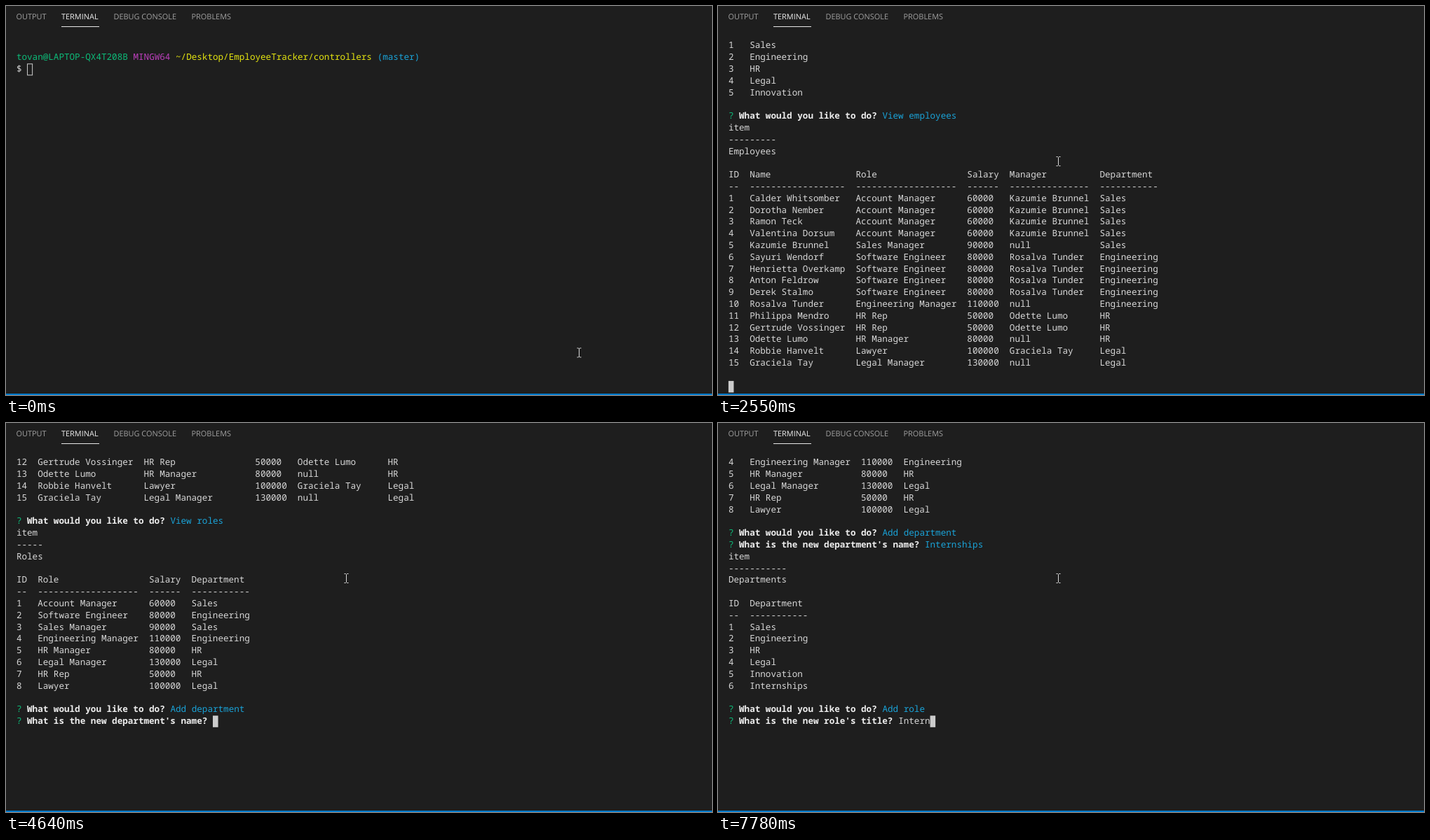
Write an HTML page that moves like this. It is 1007x556 px and loops after 8 s.

```html
<!DOCTYPE html>
<html lang="en">
<head>
<meta charset="utf-8">
<title>Terminal session</title>
<style>
  html, body { margin: 0; width: 100%; height: 100%; overflow: hidden; background: #1e1e1e; }
  svg { display: block; width: 1007px; height: 556px; }
  text { white-space: pre; text-rendering: geometricPrecision; }
  #tabs { font: 10.93px "Open Sans", "Noto Sans", sans-serif; fill: #a0a0a0; }
  #tabs .on { fill: #f0f0f0; }
  #rows { font: 12.617px "Noto Sans Mono", "DejaVu Sans Mono", monospace; fill: #d8d8d8; }
  .green { fill: #0dbc79; }
  .purple { fill: #bc3fbc; }
  .yellow { fill: #e5e510; }
  .cyan { fill: #1aa3d8; }
  .pick { fill: #1ea6e6; }
  .bold { fill: #ededed; font-weight: 700; }
</style>
</head>
<body>
<svg viewBox="0 0 1007 556">
  <rect width="1007" height="556" fill="#1e1e1e"/>
  <g id="tabs">
    <text x="14.5" y="19.3">OUTPUT</text>
    <text x="79" y="19.3" class="on">TERMINAL</text>
    <text x="153.5" y="19.3">DEBUG CONSOLE</text>
    <text x="264.5" y="19.3">PROBLEMS</text>
  </g>
  <rect x="79" y="29" width="54" height="1" fill="#e7e7e7"/>
  <g id="rows"></g>
  <rect id="caret"/>
  <path id="mouse" fill="none" stroke="#d8d8d8" d="M-3 -6.5H-1L0 -5.5L1 -6.5H3M0 -5.5V5.5M-3 6.5H-1L0 5.5L1 6.5H3"/>
  <rect y="554" width="1007" height="2" fill="#007acc"/>
</svg>
<script>
const LOOP = 8000, ROWS = 30, X0 = 14.9, Y0 = 48.7, CW = 7.57, RH = 16.8;
const HIDDEN = 0, SOLID = 1, HOLLOW = 2;
const $ = id => document.getElementById(id);

// A line is a list of [text, class] pieces.
const plain = s => [[s, '']];
const width = line => line.reduce((n, [s]) => n + s.length, 0);

function table(head, body) {
  const w = head.map((h, i) => Math.max(h.length, ...body.map(r => r[i].length)));
  const row = cells => plain(cells.map((c, i) => c.padEnd(w[i])).join('  '));
  return [row(head), row(w.map(n => '-'.repeat(n))), ...body.map(row), []];
}
const numbered = (head, body) =>
  table(['ID', ...head], body.map((r, i) => [String(i + 1), ...r]));
const titled = name => table(['item'], [[name]]);

const depts = ['Sales', 'Engineering', 'HR', 'Legal', 'Innovation'];
const roles = [
  ['Account Manager', '60000', 'Sales'],
  ['Software Engineer', '80000', 'Engineering'],
  ['Sales Manager', '90000', 'Sales'],
  ['Engineering Manager', '110000', 'Engineering'],
  ['HR Manager', '80000', 'HR'],
  ['Legal Manager', '130000', 'Legal'],
  ['HR Rep', '50000', 'HR'],
  ['Lawyer', '100000', 'Legal']
];
// Name, role index, index of the manager in this list.
const staff = [
  ['Calder Whitsomber', 0, 4], ['Dorotha Nember', 0, 4], ['Ramon Teck', 0, 4],
  ['Valentina Dorsum', 0, 4], ['Kazumie Brunnel', 2], ['Sayuri Wendorf', 1, 9],
  ['Henrietta Overkamp', 1, 9], ['Anton Feldrow', 1, 9], ['Derek Stalmo', 1, 9],
  ['Rosalva Tunder', 3], ['Philippa Mendro', 6, 12], ['Gertrude Vossinger', 6, 12],
  ['Odette Lumo', 4], ['Robbie Hanvelt', 7, 14], ['Graciela Tay', 5]
];

const deptTable = list => [...titled('Departments'), ...numbered(['Department'], list.map(d => [d]))];
const roleTable = () => [...titled('Roles'), ...numbered(['Role', 'Salary', 'Department'], roles)];
const staffTable = () => [...titled('Employees'),
  ...numbered(['Name', 'Role', 'Salary', 'Manager', 'Department'], staff.map(([name, r, boss]) => {
    const [role, pay, dept] = roles[r];
    return [name, role, pay, boss === undefined ? 'null' : staff[boss][0], dept];
  }))];

const choices = ['View departments', 'View employees', 'View roles', 'Add department',
  'Add role', 'Add employee', 'Update role'];
const ask = (question, reply, cls = 'cyan') =>
  [['? ', 'green'], [question, 'bold'], [' ' + reply, cls]];
const TODO = 'What would you like to do?';
const menu = (pick, hint = '') => [
  ask(TODO, hint, ''),
  ...choices.map((c, i) => i === pick ? [['> ' + c, 'pick']] : plain('  ' + c)),
  plain('(Move up and down to reveal more choices)')
];
const freshMenu = () => menu(0, '(Use arrow keys)');

// Screens in time order; the view scrolls as lines pass the bottom.
const shots = [];
const log = [[], [
  ['tovan@LAPTOP-QX4T208B', 'green'], [' MINGW64', 'purple'],
  [' ~/Desktop/EmployeeTracker/controllers', 'yellow'], [' (master)', 'cyan']
]];
let top0 = 0;
function shot(t, live, caret = SOLID) {
  const all = [...log, ...live];
  top0 = Math.max(top0, all.length - ROWS);
  shots.push({ t, lines: all.slice(top0), caret });
}
function type(start, step, word, line, first = 1) {
  for (let n = first; n <= word.length; n++)
    shot(start + (n - first) * step, [line(word.slice(0, n))]);
}
function print(t, ...lines) {
  log.push(...lines);
  shot(t, [[]]);
}

const shell = s => plain('$ ' + s);
shot(0, [shell('')], HOLLOW);
shot(70, [shell('')]);
type(147.7, 77.69, 'node index.js', shell);
print(1160, shell('node index.js'));
shot(1390, freshMenu(), HIDDEN);
shot(1610, [ask(TODO, choices[0])]);
print(1840, ask(TODO, choices[0]), ...deptTable(depts));
shot(2090, freshMenu());
shot(2320, menu(1));
print(2550, ask(TODO, choices[1]), ...staffTable());
shot(2780, freshMenu(), HIDDEN);
shot(3010, menu(1));
shot(3240, menu(2));
print(3470, ask(TODO, choices[2]), ...roleTable());
shot(3700, freshMenu(), HIDDEN);
shot(3930, menu(1));
shot(4160, menu(2));
shot(4390, menu(3));

const NAME = "What is the new department's name?", added = 'Internships';
log.push(ask(TODO, choices[3]));
shot(4640, [ask(NAME, '', '')]);
type(4870, 77.7, added, s => ask(NAME, s, ''), 2);
print(5800, ask(NAME, added), ...deptTable([...depts, added]));
shot(6030, freshMenu(), HIDDEN);
shot(6260, menu(1));
shot(6490, menu(2));
shot(6720, menu(3));
shot(6950, menu(4));

const TITLE = "What is the new role's title?";
log.push(ask(TODO, choices[4]));
shot(7180, [ask(TITLE, '', '')]);
type(7410, 74, 'Intern', s => ask(TITLE, s, ''));

function make(tag, attrs, parent) {
  const el = document.createElementNS('http://www.w3.org/2000/svg', tag);
  set(el, attrs);
  return parent.appendChild(el);
}
function set(el, attrs) {
  for (const k in attrs) el.setAttribute(k, attrs[k]);
}

const rows = Array.from({ length: ROWS }, (_, i) =>
  make('text', { y: (Y0 + i * RH + 11.6).toFixed(2) }, $('rows')));

function drawRow(el, line) {
  el.textContent = '';
  let col = 0;
  for (const [s, cls] of line) {
    const lead = s.length - s.trimStart().length;
    if (s.trim())
      make('tspan', { x: (X0 + (col + lead) * CW).toFixed(2), class: cls }, el).textContent = s.trim();
    col += s.length;
  }
}

function drawCaret(mode, row, col) {
  const inset = mode === HOLLOW ? 0.5 : 0;
  set($('caret'), {
    x: X0 + col * CW + inset, y: Y0 + row * RH + inset,
    width: CW - inset, height: RH - 0.3 - inset,
    fill: mode === SOLID ? '#cccccc' : 'none',
    stroke: mode === HOLLOW ? '#cccccc' : 'none'
  });
}

let shown = -1;
function render(t) {
  let i = shots.length - 1;
  while (i && shots[i].t > t) i--;
  if (i === shown) return;
  shown = i;
  const { lines, caret } = shots[i], last = lines.length - 1;
  rows.forEach((el, r) => drawRow(el, lines[r] || []));
  drawCaret(caret, last, width(lines[last]));
  set($('mouse'), { transform: i ? 'translate(485.5 222)' : 'translate(817.5 495.5)' });
}

const start = performance.now();
function tick() {
  render((performance.now() - start) % LOOP);
  requestAnimationFrame(tick);
}
tick();
</script>
</body>
</html>
```
